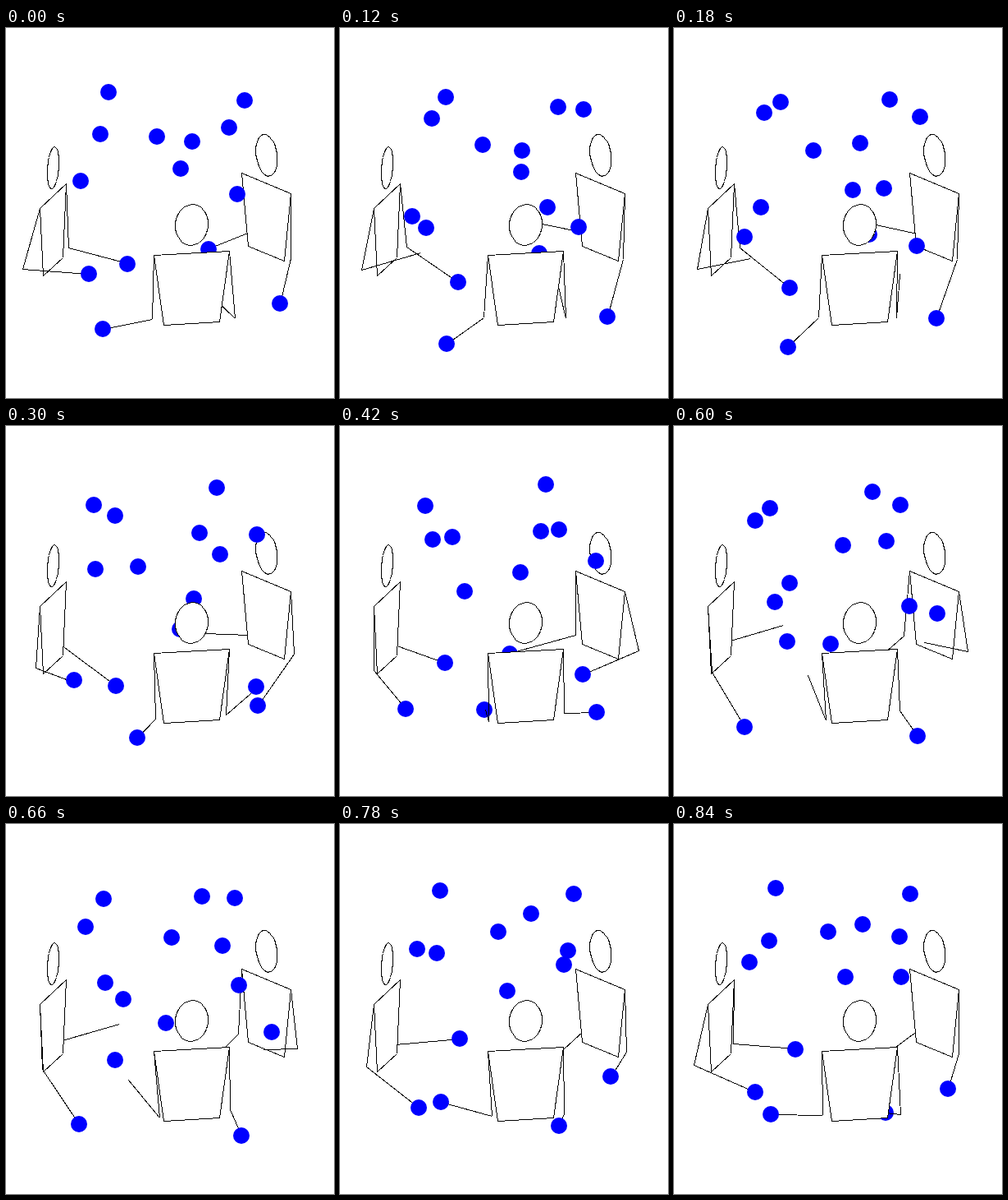
Recreate the animation shown at these times as an HTML page. Size 400 by 450 pixels, loop 900 ms.

```html
<!DOCTYPE html>
<html lang="en">
<head>
<meta charset="utf-8">
<title>Three jugglers</title>
<style>
  html, body { margin: 0; width: 100%; height: 100%; overflow: hidden; background: #fff; }
  svg { display: block; }
  path { stroke: #000; stroke-width: 1; fill: none; transform: translate(.5px, .5px); shape-rendering: crispEdges; }
  path.solid { fill: #fff; }
  circle { fill: #00f; }
</style>
</head>
<body>
<svg id="stage" width="400" height="450" viewBox="0 0 400 450"></svg>
<script>
// Lengths in cm, times in steps of 60 ms.
const STEP = 60, PERIOD = 15, BALLS = 5;
const DWELL = 9.75, EMPTY = PERIOD - DWELL;
const CYCLE = PERIOD * BALLS, HALF = CYCLE / 2, FLIGHT = HALF - DWELL;
const GRAVITY = 0.5452;               // half the acceleration
const THROW = 18.23, CATCH = 45.12, REACH = 30;
const ARM = 41, SHOULDER = 23, WAIST = 17;

// Camera
const RAD = Math.PI / 180, SCALE = 2.03, TILT = 20 * RAD;
const CX = 200.2, CY = 221.9, RADIUS = 75.1;
const PX_DEPTH = SCALE * Math.sin(TILT), PX_UP = SCALE * Math.cos(TILT);

const mod = (a, n) => ((a % n) + n) % n;

// Point beside (u), ahead (f) and above the hands (z) of a juggler, on screen
function project(who, u, f, z) {
  const c = Math.cos(who.turn), s = Math.sin(who.turn), r = f - RADIUS;
  const x = u * c - r * s, depth = u * s + r * c;
  return [CX + SCALE * x, CY - PX_DEPTH * depth - PX_UP * (z - 40)];
}

function hermite(p0, v0, p1, v1, T, t) {
  const s = t / T, s2 = s * s, s3 = s2 * s;
  return p0 * (2 * s3 - 3 * s2 + 1) + v0 * T * (s3 - 2 * s2 + s)
       + p1 * (3 * s2 - 2 * s3) + v1 * T * (s3 - s2);
}

// Hand value t steps after its throw; smooth through the catch
function handValue(p0, v0, p1, t) {
  const v1 = 1.5 * (p1 - p0) * (1 / EMPTY - 1 / DWELL) - v0 / 2;
  return t < EMPTY
    ? hermite(p0, v0, p1, v1, EMPTY, t)
    : hermite(p1, v1, p0, v0, DWELL, t - EMPTY);
}

// side: 1 right, -1 left
function hand(side, k) {
  const t = mod(k - (side > 0 ? 0 : PERIOD / 2), PERIOD);
  const vu = -(THROW + CATCH) / FLIGHT;
  return [side * handValue(THROW, vu, CATCH, t), REACH,
          handValue(0, GRAVITY * FLIGHT, 0, t)];
}

function ball(n, k) {
  const t = mod(k + n * PERIOD, CYCLE);
  const side = t < HALF ? 1 : -1, h = t % HALF;
  if (h >= FLIGHT) return hand(-side, k);
  return [side * (THROW - (THROW + CATCH) * h / FLIGHT), REACH,
          GRAVITY * h * (FLIGHT - h)];
}

// Elbow hangs in the upright plane through shoulder and hand
function elbow(side, [u, f, z]) {
  const du = u - side * SHOULDER, dz = z - 40;
  const flat = Math.hypot(du, f), d = Math.hypot(flat, dz);
  const along = d / 2, off = Math.sqrt(Math.max(0, ARM * ARM - along * along));
  const out = (along * flat + off * dz) / d;
  return [side * SHOULDER + du / flat * out, f / flat * out,
          40 + (along * dz - off * flat) / d];
}

const stage = document.getElementById("stage");
function add(name, attrs = {}) {
  const el = document.createElementNS("http://www.w3.org/2000/svg", name);
  for (const key in attrs) el.setAttribute(key, attrs[key]);
  return stage.appendChild(el);
}
const line = pts => "M" + pts.map(p => p.map(Math.round).join()).join("L");

function addBody(who) {
  const at = (u, z) => project(who, u, 0, z);
  const head = [];
  for (let a = 0; a < 360; a += 9)
    head.push(at(10 * Math.cos(a * RAD), 58 + 13 * Math.sin(a * RAD)));
  const torso = [at(-SHOULDER, 40), at(SHOULDER, 40), at(WAIST, -5), at(-WAIST, -5)];
  for (const shape of [torso, head])
    add("path", { class: "solid", d: line(shape) + "Z" });
}

// Stacked from far to near
const right = { turn: 129.8 * RAD, near: -1 };
const left = { turn: -110.2 * RAD, near: 1 };
const front = { turn: 9.8 * RAD };
const arms = [], balls = [];

for (const who of [right, left]) {
  const addArm = side => {
    const el = add("path");
    arms.push({ who, side, upper: el, fore: el });
  };
  addArm(-who.near);
  addBody(who);
  addArm(who.near);
}
const fores = [-1, 1].map(() => add("path"));
for (const who of [right, left, front])
  for (let n = 0; n < BALLS; n++)
    balls.push({ who, n, el: add("circle", { r: 10 }) });
[-1, 1].forEach((side, i) =>
  arms.push({ who: front, side, upper: add("path"), fore: fores[i] }));
addBody(front);

function draw(k) {
  for (const { who, side, upper, fore } of arms) {
    const h = hand(side, k);
    const a = project(who, side * SHOULDER, 0, 40);
    const b = project(who, ...elbow(side, h));
    const c = project(who, ...h);
    // A raised forearm seen almost end-on lies over its ball
    const over = c[1] < b[1] && Math.hypot(b[0] - c[0], b[1] - c[1]) < 25;
    if (upper === fore || over) {
      fore.setAttribute("d", "");
      upper.setAttribute("d", line([a, b, c]));
    } else {
      upper.setAttribute("d", line([a, b]));
      fore.setAttribute("d", line([b, c]));
    }
  }
  for (const { who, n, el } of balls) {
    const [x, y] = project(who, ...ball(n, k));
    el.setAttribute("cx", Math.round(x - 0.2));
    el.setAttribute("cy", Math.round(y + 0.2));
  }
}

const start = performance.now();
let shown = -1;
function tick() {
  const k = Math.floor((performance.now() - start) / STEP) % PERIOD;
  if (k !== shown) draw(shown = k);
  requestAnimationFrame(tick);
}
tick();
</script>
</body>
</html>
```
